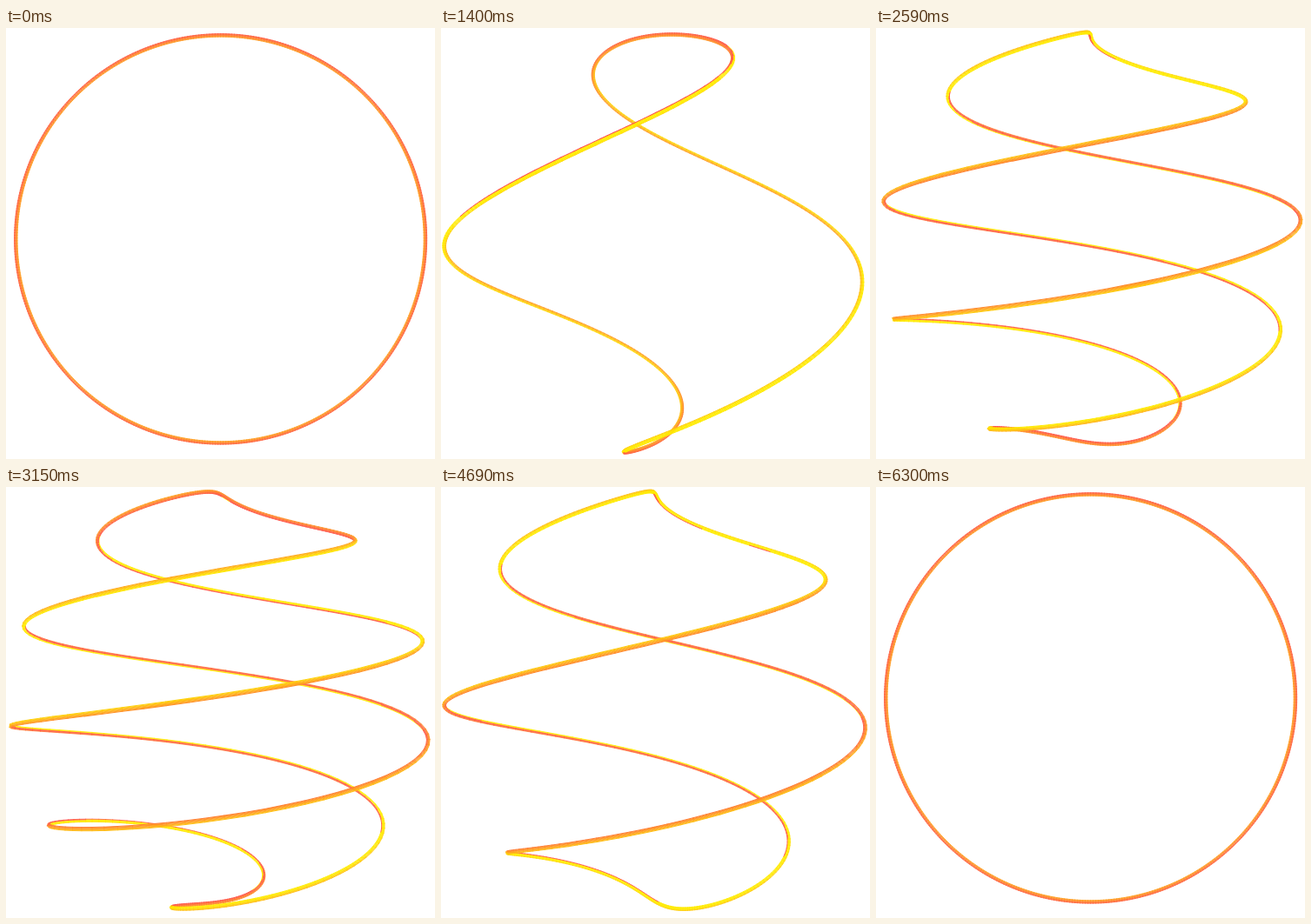
An HTML page with a canvas that plays this animation: 493x496 px, repeating every 6370 ms.

```html
<!DOCTYPE html>
<html lang="en">
<head>
<meta charset="utf-8">
<title>Twisting ring</title>
<style>
  html, body { margin: 0; width: 100%; height: 100%; overflow: hidden; background: #fff; }
  canvas { display: block; }
</style>
</head>
<body>
<canvas id="stage" width="493" height="496"></canvas>
<script>
const ctx = document.getElementById('stage').getContext('2d');
const STEP = 70, STEPS = 91;
const CX = 246.6, CY = 247.9, DIST = 4, FOCAL = 941;
const TILT = 0.085, SEGMENTS = 480, STRIPS = 7, TUBE = 0.0086;
const RAD = Math.PI / 180;

const dot = (a, b) => a[0] * b[0] + a[1] * b[1] + a[2] * b[2];
const cross = (a, b) => [
  a[1] * b[2] - a[2] * b[1],
  a[2] * b[0] - a[0] * b[2],
  a[0] * b[1] - a[1] * b[0]
];
const unit = a => {
  const l = Math.hypot(...a) || 1;
  return a.map(c => c / l);
};
const smooth = x => x * x * (3 - 2 * x);

// Turn of the lower pole in degrees: [step, angle]
const TURN = [[0, 0], [12, -22], [28, -102.5], [45, -205], [59, -264], [75, -331.5], [90, -360]];

function slope(i) {
  if (i === 0 || i === TURN.length - 1) return 0;
  const [p, q, r] = [TURN[i - 1], TURN[i], TURN[i + 1]];
  const h0 = q[0] - p[0], h1 = r[0] - q[0];
  return ((q[1] - p[1]) / h0 * h1 + (r[1] - q[1]) / h1 * h0) / (h0 + h1);
}

function turnAt(n) {
  let i = 0;
  while (i < TURN.length - 2 && n > TURN[i + 1][0]) i++;
  const [x0, y0] = TURN[i], [x1, y1] = TURN[i + 1];
  const h = x1 - x0, s = (n - x0) / h;
  return y0 + (y1 - y0) * smooth(s)
    + h * s * (1 - s) * ((1 - s) * slope(i) - s * slope(i + 1));
}

const twistAt = n => 398.5 * smooth(n < 51 ? n / 51 : (90 - n) / 39);

// Point of the twisted great circle, in camera axes
function ringPoint(a, turn, twist) {
  const z = Math.cos(a), r = Math.sin(a);
  const psi = (turn - twist * (1 + z)) * RAD;
  const x = r * Math.cos(psi), d = r * Math.sin(psi);
  const c = Math.cos(TILT), s = Math.sin(TILT);
  return [x, z * c - d * s, d * c + z * s];
}

// Red to yellow around the tube
function tint(v) {
  const s = Math.min(1, v / 0.78);
  return `rgb(255,${Math.round(75 + 160 * s)},${Math.round(76 * (1 - s))})`;
}

function draw(n) {
  const turn = turnAt(n), twist = twistAt(n);
  const seam = twist > 180 ? 0.5 : -0.04;
  const pts = [];
  for (let i = 0; i < SEGMENTS; i++) {
    const a = i / SEGMENTS * 2 * Math.PI;
    const p = ringPoint(a, turn, twist);
    const before = ringPoint(a - 0.002, turn, twist);
    const after = ringPoint(a + 0.002, turn, twist);
    const t = unit(after.map((c, j) => c - before[j]));
    const side = unit(cross(t, [-p[0], -p[1], DIST - p[2]]));
    const scale = FOCAL / (DIST - p[2]);
    const len = Math.hypot(side[0], side[1]) || 1;
    pts.push({
      p, t, side,
      front: unit(cross(side, t)),
      x: CX + p[0] * scale,
      y: CY - p[1] * scale,
      sx: side[0] / len,
      sy: -side[1] / len,
      half: TUBE * scale
    });
  }

  const order = pts.map((_, i) => i).sort((i, j) => pts[i].p[2] - pts[j].p[2]);
  ctx.fillStyle = '#fff';
  ctx.fillRect(0, 0, 493, 496);
  ctx.lineCap = 'round';

  for (const i of order) {
    const a = pts[i], b = pts[(i + 1) % SEGMENTS];
    const across = cross(a.t, a.p);
    ctx.lineWidth = a.half * 2 / STRIPS + 0.3;
    for (let k = 0; k < STRIPS; k++) {
      const u = (2 * k + 1) / STRIPS - 1;
      const w = Math.sqrt(1 - u * u);
      const normal = a.side.map((c, j) => c * u + a.front[j] * w);
      const angle = Math.atan2(dot(normal, across), dot(normal, a.p)) / (2 * Math.PI);
      ctx.strokeStyle = tint((angle + seam + 1) % 1);
      ctx.beginPath();
      ctx.moveTo(a.x + a.sx * u * a.half, a.y + a.sy * u * a.half);
      ctx.lineTo(b.x + b.sx * u * b.half, b.y + b.sy * u * b.half);
      ctx.stroke();
    }
  }
}

let shown = -1;
const start = performance.now();
function tick() {
  const n = Math.floor((performance.now() - start) / STEP) % STEPS;
  if (n !== shown) draw(shown = n);
  requestAnimationFrame(tick);
}
tick();
</script>
</body>
</html>
```
